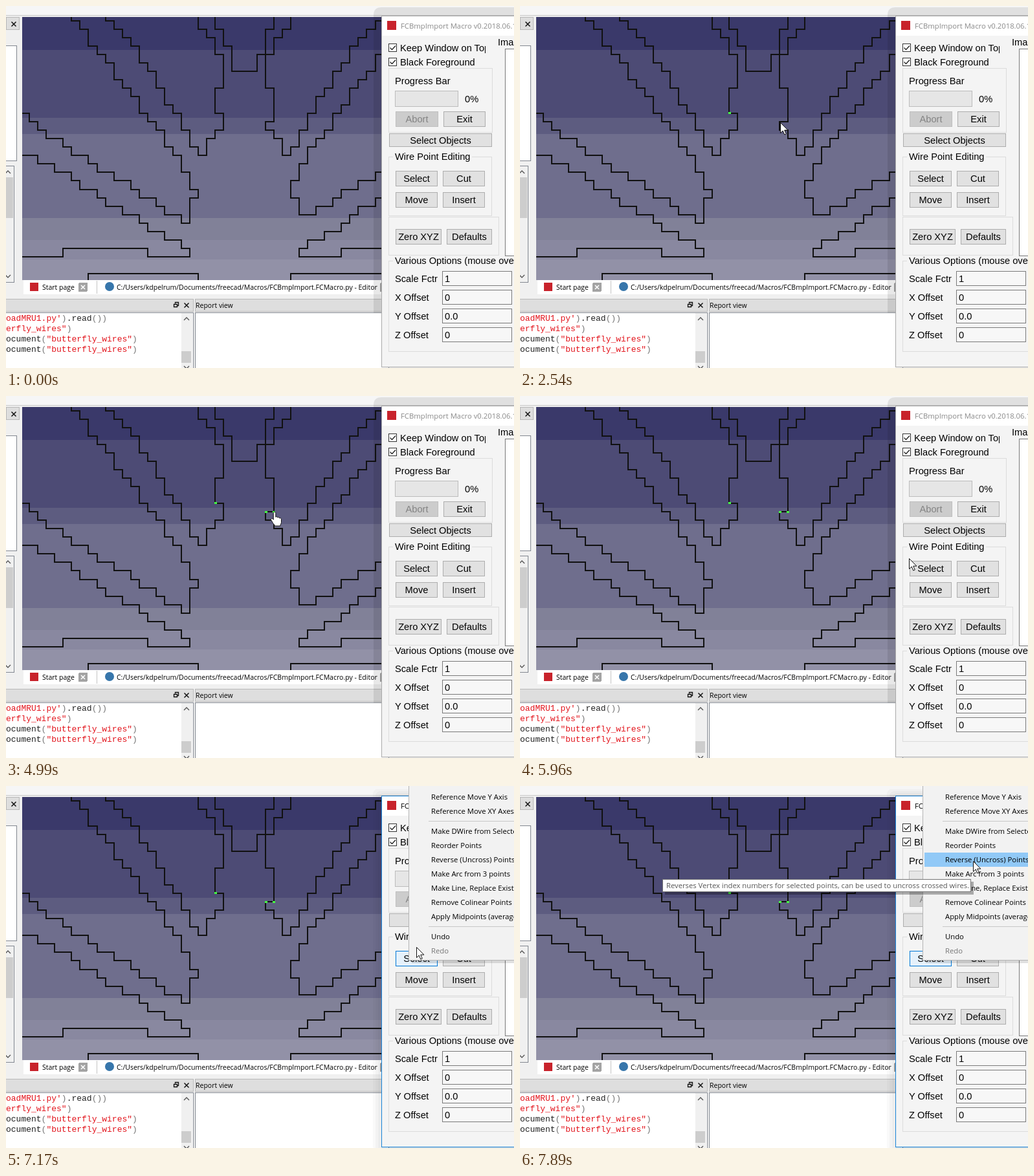
These frames come from a looping animation (785 by 560 pixels, 8 s). An HTML page:

```html
<!DOCTYPE html>
<html lang="en">
<head>
<meta charset="utf-8">
<title>Wire point editing</title>
<style>
  html, body { margin: 0; width: 100%; height: 100%; overflow: hidden; background: #f0f0f0; }
  svg { display: block; }
  text { white-space: pre; }
  .form { font: 14.67px "Liberation Sans", Arial, sans-serif; }
  .ui { font: 10.5px "Open Sans", "Noto Sans", sans-serif; }
  .menu { font: 11.3px "Open Sans", "Noto Sans", sans-serif; }
  .tip { font: 11.25px "Open Sans", "Noto Sans", sans-serif; fill: #575757; }
  .code { font: 13px "Liberation Mono", "Courier New", monospace; }
  .wire path { fill: none; stroke: #111; stroke-width: 2; vector-effect: non-scaling-stroke; shape-rendering: crispEdges; }
  rect { shape-rendering: crispEdges; }
</style>
</head>
<body>
<svg id="stage" width="785" height="560" viewBox="0 0 785 560"></svg>
<script>
const LOOP = 8000;

// Markup helpers
const box = (x, y, w, h, fill, stroke, extra = '') => stroke
  ? `<rect x="${x + .5}" y="${y + .5}" width="${w - 1}" height="${h - 1}" fill="${fill}" stroke="${stroke}" ${extra}/>`
  : `<rect x="${x}" y="${y}" width="${w}" height="${h}" fill="${fill}" ${extra}/>`;
const label = (x, y, str, cls = 'form', extra = '') =>
  `<text x="${x}" y="${y}" class="${cls}" ${extra}>${str}</text>`;
const line = (d, stroke = '#333', width = 1) =>
  `<path d="${d}" fill="none" stroke="${stroke}" stroke-width="${width}"/>`;
const cross = (x, y, r, stroke, width) =>
  line(`M${x - r} ${y - r}l${2 * r} ${2 * r}m0 ${-2 * r}l${-2 * r} ${2 * r}`, stroke, width);
const group = (id, body) => `<g id="${id}">${body}</g>`;

function button(x, y, w, str, { h = 24, off = false, id = '' } = {}) {
  return box(x, y, w, h, off ? '#ccc' : '#e1e1e1', off ? '#bfbfbf' : '#adadad', id && `id="${id}"`) +
    label(x + w / 2, y + h / 2 + 5, str, 'form', `text-anchor="middle" fill="${off ? '#838383' : '#000'}"`);
}

const checkbox = (y, str) => box(591, y, 13, 13, '#fff', '#333') +
  line(`M593.5 ${y + 6.5}l3 3 5.5-6`, '#222', 1.3) + label(609, y + 12, str);

const frame = (y, w, h, title) => box(591, y, w, h, 'none', '#dcdcdc') +
  (title ? box(598, y - 3, 122, 8, '#f4f4f4') + label(601, y + 5, title) : '');

// 3D view: banded backdrop and stair-stepped outlines on a square grid
const bands = [[17, '#3a396a'], [68, '#4d4b75'], [173, '#5d5c80'], [198, '#6f6e8d'],
  [328, '#818198'], [362, '#8988a0'], [392, '#9291a7']];
const wires = [
  'M6-1v1h1v1h1v2h1v1h1v1h1v2h1v1h1v1h1v2h1v1h1v1h1v2h1v1h1v2h1v2h1v1h-1v3h-1v-1h-2v-1h-1v-1h-2v-1h-1v-1h-2v-1h-2v-1h-1v-1h-2v-1h-1v-1h-2v-1h-1v-1h-1v-1h-1',
  'M9-1h1v1h1v1h1v1h1v1h1v2h1v1h1v2h1v2h1v1h1v2h1v2h1v1h1v-2h1v-1h1v-2h-1v-3h1v-4h-1v-2h-1v-1h-1v-3',
  'M23-1v2h1v2h1v3h3v-2h1v-3h1v-2',
  'M32-1v2h-1v1h-1v2h-1v4h1v4h-1v1h1v1h1v2h1v-1h1v-2h1v-2h1v-2h1v-1h1v-2h1v-1h1v-2h1v-1h1v-1h1v-1h1',
  'M43 4h-1v2h-1v1h-1v1h-1v2h-1v1h-1v2h-1v1h-1v1h-1v2h-1v2h-1v2h1v2h2v-1h2v-1h1v-1h2v-1h2v-1h1',
  'M0 16h2v1h2v1h2v1h1v1h2v1h1v1h2v1h2v1h1v1h2v1h2v1h1v1h-5v-1h-10v1h-6',
  'M43 21h-1v1h-2v1h-1v1h-1v1h-2v1h-2v1h-1v1h5v-1h10',
  'M8 31v-1h13v1', 'M32 31v-1h12'];

const view = `<svg x="25" y="17" width="555" height="407" viewBox="25 17 555 407">` +
  bands.map(([y, c]) => box(25, y, 555, 424 - y, c)).join('') +
  `<g class="wire" transform="translate(23.25 22.9) scale(13.03)">${wires.map(d => `<path d="${d}"/>`).join('')}</g></svg>`;

const leftDock = box(0, 17, 21, 20, '#dedede', '#b8b8b8') + cross(12, 28, 3.5, '#111', 1.5) +
  box(-2, 61, 19, 179, '#fff', '#828790') + box(-2, 247, 15, 181, '#fff', '#828790') +
  box(0, 248, 12, 179, '#f0f0f0') + box(0, 265, 11, 63, '#cdcdcd') +
  line('M-1 259l4-4 4 4M-1 416l4 4 4-4', '#555', 1.4);

const closeTab = x => `<rect x="${x}" y="428" width="14" height="14" rx="2" fill="#a3a3a3"/>` + cross(x + 7, 435, 3, '#fff', 1.6);
const tabs = box(27, 424, 553, 22, '#fff') + line('M140.5 425v20', '#c4c4c4') +
  box(37, 428, 13, 13, '#c8232c') + label(56, 439, 'Start page', 'ui') + closeTab(112) +
  '<circle cx="160" cy="434" r="7" fill="#3776ab"/>' +
  label(171, 439, 'C:/Users/kdpelrum/Documents/freecad/Macros/FCBmpImport.FCMacro.py - Editor', 'ui') + closeTab(578);

const red = s => `<tspan fill="#e3141c">${s}</tspan>`;
const open = '<tspan fill="#777">(</tspan>', close = '<tspan fill="#777">)</tspan>';
const consoleLines = [red("oadMRU1.py'") + close + '.read' + open + close + close,
  red('erfly_wires"') + close,
  ...Array(2).fill('ocument' + open + red('"butterfly_wires"') + close)];
const lowerDocks = box(-1, 453, 291, 20, '#dedede', '#b8b8b8') + box(292, 453, 300, 20, '#dedede', '#b8b8b8') +
  label(293, 467, 'Report view', 'ui') + cross(279, 463, 3.5, '#111', 1.5) +
  line('M261.5 460.5v-2h5v5h-2M259.5 461.5h5v4h-5z', '#111', 1.3) +
  box(-1, 474, 291, 90, '#fff', '#828790') + box(292, 474, 300, 90, '#fff', '#828790') +
  box(271, 475, 17, 85, '#f0f0f0') + box(271, 534, 15, 18, '#cdcdcd') +
  line('M275 486l4-4 4 4M275 557l4 4 4-4', '#555', 1.4) +
  consoleLines.map((s, i) => label(0, 487 + 16 * i, s, 'code', 'fill="#222"')).join('');

// Macro window
const fields = [['Scale Fctr', '1'], ['X Offset', '0'], ['Y Offset', '0.0'], ['Z Offset', '0']];
const dialog =
  box(580, 15, 220, 544, '#f4f4f4') + box(580, 15, 220, 31, '#fff') +
  box(580, 15, 220, 544, 'none', '#aaa', 'id="edge"') +
  box(589, 23, 14, 14, '#c8232c') +
  label(610, 35, 'FCBmpImport Macro v0.2018.06.15', 'menu', 'id="title"') +
  `<svg x="580" y="46" width="161" height="60" viewBox="580 46 161 60">${checkbox(58, 'Keep Window on Top')}${checkbox(80, 'Black Foreground')}</svg>` +
  label(760, 61, 'Images') + box(771, 66, 40, 321, '#fff', '#7a7a7a') +
  frame(96, 161, 100) + label(601, 121, 'Progress Bar') +
  box(601, 131, 98, 25, '#e6e6e6', '#bcbcbc') + label(709, 149, '0%') +
  button(602, 163, 66, 'Abort', { off: true }) + button(676, 163, 65, 'Exit') +
  button(592, 197, 159, 'Select Objects', { h: 21 }) +
  frame(233, 160, 92, 'Wire Point Editing') +
  button(602, 255, 65, 'Select', { id: 'select' }) + button(675, 255, 65, 'Cut') +
  button(602, 288, 65, 'Move') + button(675, 288, 65, 'Insert') +
  frame(326, 171, 60) + button(602, 345, 71, 'Zero XYZ') + button(681, 345, 70, 'Defaults') +
  box(591, 394, 220, 141, 'none', '#dcdcdc') + box(598, 390, 190, 10, '#f4f4f4') +
  label(601, 399, 'Various Options (mouse over)') +
  fields.map(([name, value], i) => label(601, 427 + 29 * i, name) +
    box(674, 410 + 29 * i, 108, 23, '#f7f7f7', '#7a7a7a') + label(678, 427 + 29 * i, value)).join('');

const shadows =
  group('softShadow', [13, 9, 5].map(d => `<rect x="${580 - d}" y="${15 - d * .8}" width="230" height="560" rx="8" fill="#000" opacity=".025"/>`).join('')) +
  group('flatShadow', '<path d="M568 475V14q0-12 12-12h205v13H580v460z" fill="#000" opacity=".09"/>');

// Context menu: [row centre, caption]
const items = [[17, 'Reference Move Y Axis'], [39, 'Reference Move XY Axes'], [70, 'Make DWire from Selected'],
  [92, 'Reorder Points'], [114, 'Reverse (Uncross) Points'], [136, 'Make Arc from 3 points'],
  [158, 'Make Line, Replace Existing'], [180, 'Remove Colinear Points'],
  [202, 'Apply Midpoints (average)'], [233, 'Undo'], [255, 'Redo']];
const menu = box(627, 0, 170, 274, '#000', '', 'opacity=".12"') + box(622, -2, 180, 272, '#f2f2f2', '#b5b5b5') +
  box(625, 0, 170, 22, '#91c9f7', '', 'id="bar"') +
  line('M653 54.5h140M653 217.5h140', '#c8c8c8') +
  items.map(([y, s]) => label(657, y + 4, s, 'menu', s === 'Redo' ? 'fill="#777"' : '')).join('');

const tipBox = (x, y, w, h) => box(x + 4, y + 4, w, h, '#000', '', 'opacity=".3"') + box(x, y, w, h, '#fff', '#767676');
const rightText = 'text-anchor="end"';
const tips =
  group('midTip', tipBox(-5, 234, 672, 34) +
    label(631, 246, 'Smooths jagged, pixellated edges by replacing the first point of every set of 2 consecutive points with the midpoint between them.', 'tip', rightText) +
    label(660, 261, 'Recommended to import as a Wire object(s), and apply this operation to all imported Wires, followed by the Remove Colinear operation.', 'tip', rightText)) +
  group('reverseTip', tipBox(220, 144, 477, 20) +
    label(226, 158, 'Reverses Vertex index numbers for selected points, can be used to uncross crossed wires.', 'tip'));

const points = [[322, 164], [400, 178], [412, 178]]
  .map(([x, y], i) => box(x, y, 4, 3, '#4f4', '', `id="point${i}"`)).join('');
const pointer = (id, d) => `<path id="${id}" d="${d}" fill="#fff" stroke="#111" stroke-linejoin="round"/>`;

document.getElementById('stage').innerHTML =
  box(0, 0, 785, 560, '#f0f0f0') + box(0, 0, 785, 14, '#f6f6f6') + line('M0 14.5h785', '#c8c8c8') +
  leftDock + view + points + tabs + lowerDocks + shadows + dialog +
  group('menu', menu) + tips +
  pointer('arrow', 'M.5.5v16l3.7-3.5 2.6 6 2.5-1.1-2.6-5.8h5.2z') +
  pointer('hand', 'M6 .5c1 0 1.8.7 1.8 1.8v6c.3-.9 3-.7 3 .8.6-.9 2.8-.5 2.9 1 .8-.8 2.8-.2 2.8 1.6v4.5c0 2.5-1.7 3.4-1.7 5.8H6.2c0-2-1.7-2.8-2.7-4.5L.9 13.2c-1.3-2 .9-3.6 2.4-2l.9 1.1v-10C4.2 1.2 5 .5 6 .5z');

// Pointer poses, each held until the next: [time, x, y, isHand]
const poses = [
  [120, 486, 117], [240, 437, 141], [360, 389, 156], [480, 376, 157], [600, 355, 157], [710, 343, 157], [830, 322, 165],
  [1220, 319, 165, 1], [1330, 344, 169], [1450, 374, 176], [1560, 396, 179],
  [1920, 395, 178, 1], [2540, 402, 180], [2920, 395, 177, 1], [3400, 396, 177], [3780, 400, 179], [3910, 397, 178],
  [4270, 394, 179, 1], [4630, 402, 180, 1], [4870, 409, 179, 1],
  [5350, 413, 180], [5470, 422, 185], [5590, 453, 193], [5710, 510, 213], [5840, 565, 240], [5960, 601, 251], [6090, 609, 254],
  [6200, 620, 258], [6320, 622, 260],
  [7170, 634, 249], [7290, 650, 232], [7410, 668, 211], [7530, 675, 201], [7650, 680, 192], [7770, 691, 152], [7890, 700, 116]];

const $ = id => document.getElementById(id);
const show = (id, on) => $(id).setAttribute('display', on ? 'inline' : 'none');
const paint = (id, attrs) => Object.entries(attrs).forEach(([k, v]) => $(id).setAttribute(k, v));

function render(t) {
  const pose = poses.filter(p => p[0] <= t).pop();
  const [, x, y, isHand] = pose || [0, 0, 0];
  show('arrow', pose && !isHand);
  show('hand', isHand);
  paint(isHand ? 'hand' : 'arrow', { transform: `translate(${x} ${y})` });

  // Each vertex is yellow under the pointer, then green once picked
  [[1220, 1330], [4270, 4510], [4870, 4990]].forEach(([hover, pick], i) => {
    show('point' + i, t >= hover);
    paint('point' + i, { fill: t < pick ? '#ff3' : '#4f4' });
  });

  const active = t >= 6320, hot = t >= 6200;
  paint('edge', { stroke: active ? '#1883d7' : '#aaa' });
  paint('title', { fill: active ? '#000' : '#8a8a8a' });
  paint('select', { fill: hot ? '#e5f1fb' : '#e1e1e1', stroke: hot ? '#0078d7' : '#adadad' });
  show('softShadow', active);
  show('flatShadow', !active);

  show('menu', t >= 6570);
  paint('menu', { opacity: t < 6690 ? .2 : t < 6800 ? .6 : 1 });
  const row = items.find(([cy]) => Math.abs(cy - y) <= 11);
  show('bar', t >= 7290 && row);
  if (row) paint('bar', { y: row[0] - 11 });
  show('midTip', t >= 7530 && t < 7770);
  show('reverseTip', t >= 7890);
}

let start;
function tick(now) {
  start ??= now;
  render((now - start) % LOOP);
  requestAnimationFrame(tick);
}
render(0);
requestAnimationFrame(tick);
</script>
</body>
</html>
```
